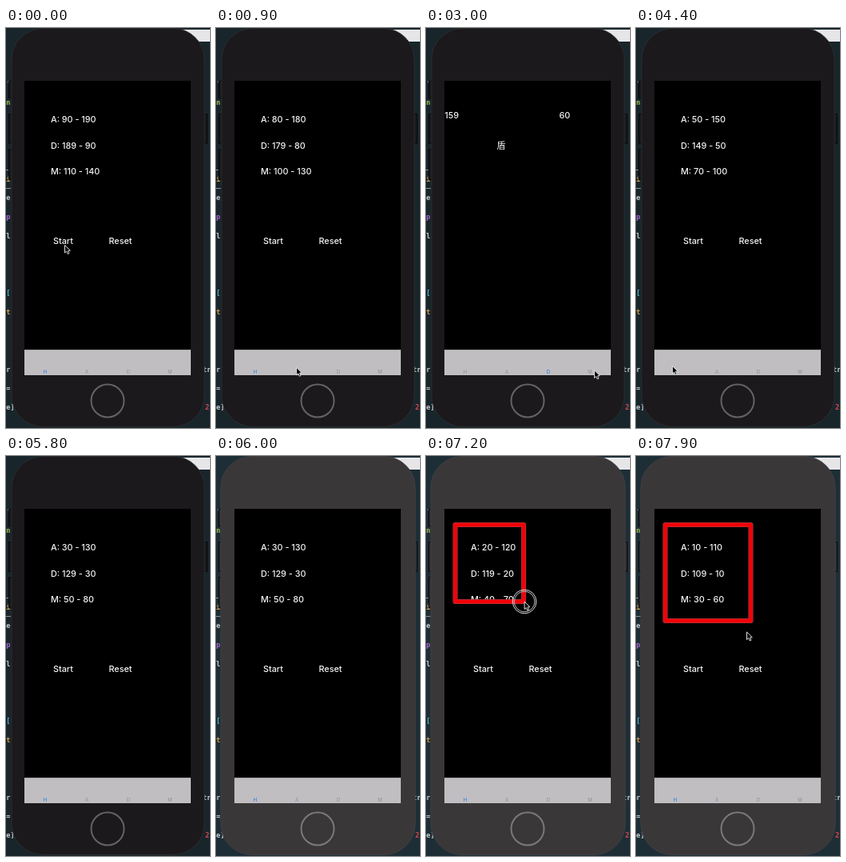
An HTML page with a canvas that plays this animation: 255 by 500 pixels, repeating every 8 s.

```html
<!DOCTYPE html>
<html lang="en">
<head>
<meta charset="utf-8">
<style>
  html, body { margin: 0; width: 100%; height: 100%; overflow: hidden; background: #18262c; }
  canvas { display: block; width: 255px; height: 500px; }
</style>
</head>
<body>
<canvas id="stage" width="255" height="500"></canvas>
<script>
const ctx = document.getElementById('stage').getContext('2d');
const LOOP = 8000, STEP = 100;
const SANS = 'Inter, Roboto, sans-serif';
const MONO = '"DejaVu Sans Mono", monospace';
const CJK = '"Noto Sans CJK TC", "Noto Sans CJK", "Noto Sans CJK JP", sans-serif';

const tabs = [...'HADM'];
const glyphs = { A: '劍', D: '盾', M: '魔' };
const codeLines = ["'", 'n', '', '', '', 'i', 'e', 'p', 'l', '', '', '[', 't', '', '', 'r', '=', 'e]'];
const codeColors = { "'": '#8d7bd0', n: '#9cc052', i: '#d5a23c', p: '#a468cf', '[': '#4fb3c6', t: '#d59a45' };

const tabPoint = i => [45 + 55 * i, 421.5 + 1.8 * i];
const dragStart = [36, 84], dragEnd = [144, 205];
const DRAG_DONE = 7400;

// Pointer moves: start ms, end ms, destination
const moves = [
  [100, 900, tabPoint(1)],
  [1600, 2000, tabPoint(2)],
  [2600, 3000, tabPoint(3)],
  [3400, 4000, tabPoint(0)],
  [4600, 5100, [49, 161]],
  [6300, 6400, [1, 228]],
  [6400, 6600, dragStart],
  [6700, DRAG_DONE, dragEnd],
  [7700, 7900, [138, 219]]
];

function ease(t, start, end) {
  const k = Math.min(1, Math.max(0, (t - start) / (end - start)));
  return k * k * (3 - 2 * k);
}

function pointerAt(t) {
  return moves.reduce(([x, y], [start, end, [toX, toY]]) => {
    const k = ease(t, start, end);
    return [x + (toX - x) * k, y + (toY - y) * k];
  }, [73, 270.5]);
}

function tabAt(t) {
  if (t < 1500 || t >= 4200) return 'H';
  return t < 2600 ? 'A' : t < 3300 ? 'D' : 'M';
}

function box(x, y, w, h, color) {
  ctx.fillStyle = color;
  ctx.fillRect(x, y, w, h);
}

function text(str, x, y, { color = '#f4f4f4', font = `500 10.8px ${SANS}`, align = 'left' } = {}) {
  ctx.font = font;
  ctx.fillStyle = color;
  ctx.textAlign = align;
  ctx.fillText(str, x, y);
}

function stroke(width, color) {
  ctx.lineWidth = width;
  ctx.strokeStyle = color;
  ctx.stroke();
}

function ring(x, y, r, width, color) {
  ctx.beginPath();
  ctx.arc(x, y, r, 0, Math.PI * 2);
  stroke(width, color);
}

function drawEditor(active) {
  box(0, 0, 255, 500, active ? '#18262c' : '#1d2e36');
  box(200, 2, 55, 15, '#e6e6e8');
  box(0, 177, 6, 1, '#8b9498');
  box(0, 200, 6, 1, '#8b9498');
  const lineY = i => 72.5 + 23.8 * i;
  const font = `bold 8.5px ${MONO}`;
  codeLines.forEach((line, i) =>
    text(line, 0.3, lineY(i), { color: codeColors[line] || '#c8cccd', font }));
  text('tr', 246, lineY(15), { color: '#c8cccd', font });
  text('2', 249, lineY(17), { color: '#e0444c', font });
}

function drawSideButton(x, y, h, active) {
  ctx.beginPath();
  ctx.rect(x, y, 6, h);
  ctx.fillStyle = active ? '#18191c' : '#2b2b2e';
  ctx.fill();
  stroke(1, '#080a0c');
}

function drawPhone(active) {
  drawSideButton(3.5, 66.5, 21, active);
  drawSideButton(3.5, 107.5, 37, active);
  drawSideButton(3.5, 151.5, 38, active);
  drawSideButton(245.5, 107.5, 37, active);
  const edge = active ? 7 : 6;
  ctx.beginPath();
  ctx.roundRect(edge, 0.5, 255 - 2 * edge, 498, 39);
  ctx.fillStyle = active ? '#1b191c' : '#3a3739';
  ctx.fill();
  stroke(1, active ? '#2b2c2f' : '#413f41');
  ring(127, 466, 20.5, 2, active ? '#646266' : '#7b787b');
  box(23, 66, 208, 368, '#000');
}

function drawPage(tab, a) {
  const pairs = { A: [a, a + 100], D: [a + 99, a], M: [a + 20, a + 50] };
  if (tab === 'H') {
    Object.keys(pairs).forEach((key, i) =>
      text(`${key}: ${pairs[key].join(' - ')}`, 56, 118 + i * 32.5));
    text('Start', 59, 270);
    text('Reset', 128.5, 270);
  } else {
    text(pairs[tab][0], 23.3, 113);
    text(pairs[tab][1], 166.5, 113);
    text(glyphs[tab], 88.5, 151, { font: `11px ${CJK}` });
  }
  box(23, 402, 208, 32, '#c1bec2');
  box(23, 402, 208, 1, '#a4a2a5');
  tabs.forEach((key, i) => text(key, 49 + i * 52, 432, {
    color: key === tab ? '#1379e6' : '#918e93', font: `6px ${SANS}`, align: 'center'
  }));
}

function drawMarker([x, y]) {
  const [left, top] = dragStart;
  ctx.lineJoin = 'round';
  ctx.beginPath();
  ctx.rect(left + 0.5, top + 2, x - left - 1, y - top - 1);
  stroke(6, '#8a5555');
  stroke(5, '#f20008');
}

function drawPointer([x, y]) {
  ctx.beginPath();
  for (const [dx, dy] of [[0, 0], [0, 9.5], [2.2, 7.6], [3.8, 11], [5.4, 10.2], [4, 6.9], [6.8, 6.7]])
    ctx.lineTo(x + 0.5 + dx, y + 1 + dy);
  ctx.closePath();
  ctx.fillStyle = '#000';
  ctx.fill();
  ctx.lineJoin = 'miter';
  stroke(1, '#dedede');
}

function draw(t) {
  const active = t < 6000;
  const value = 90 - 10 * Math.floor((t + 200) / 1000);
  const pointer = pointerAt(t);

  drawEditor(active);
  drawPhone(active);
  drawPage(tabAt(t), value);
  if (t >= 6900) drawMarker(pointerAt(Math.min(t, DRAG_DONE)));
  if (t >= 6800 && t < 7600) {
    const [x, y] = pointer;
    ring(x + 0.5, y + 1, 14.8, 1, '#dedede');
    ring(x + 0.5, y + 1, 12.8, 1, '#b8b8b8');
  }
  if (t < 5500 || t >= 6400) drawPointer(pointer);
}

function tick() {
  draw(Math.floor(performance.now() % LOOP / STEP) * STEP);
  requestAnimationFrame(tick);
}
tick();
</script>
</body>
</html>
```
